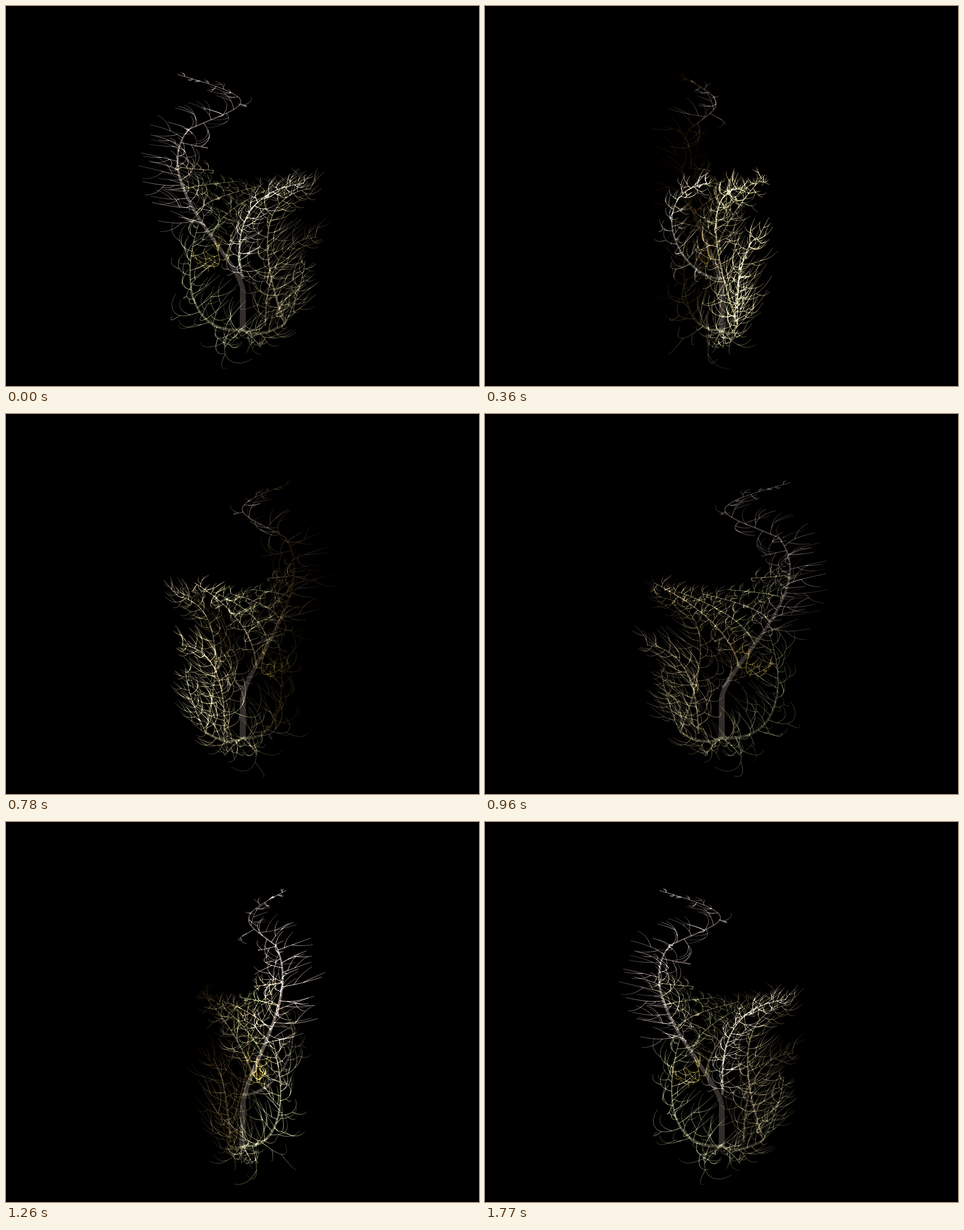
Write an HTML page with a canvas that moves like this. It is 835 px wide and 671 px high and loops after 1.8 s.

```html
<!DOCTYPE html>
<html lang="en">
<head>
<meta charset="utf-8">
<title>Turning tree</title>
<style>
  html, body { margin: 0; width: 100%; height: 100%; overflow: hidden; background: #000; }
  canvas { display: block; }
</style>
</head>
<body>
<canvas id="stage" width="835" height="671"></canvas>
<script>
const ctx = document.getElementById('stage').getContext('2d');
const AXIS = 418, LOOP = 1800, STEP = 30;
const segments = [];

let seed = 7;
const rand = () => (seed = (seed * 16807) % 2147483647) / 2147483647;
const spread = n => (rand() - 0.5) * n;

// Vectors are [x from the axis, y down the screen, z away from the viewer].
const add = (a, b, k = 1) => a.map((v, i) => v + b[i] * k);
const sub = (a, b) => add(a, b, -1);
const mix = (a, b, t) => a.map((v, i) => v + (b[i] - v) * t);
const size = a => Math.hypot(...a);
const unit = a => { const n = size(a) || 1; return a.map(v => v / n); };
const cross = (a, b) => [
  a[1] * b[2] - a[2] * b[1],
  a[2] * b[0] - a[0] * b[2],
  a[0] * b[1] - a[1] * b[0]
];

// Bezier curve of any degree
function bezier(points, t) {
  while (points.length > 1) points = points.slice(1).map((p, i) => mix(points[i], p, t));
  return points[0];
}

function line(a, b, width, tint, level) {
  segments.push({ a, b, width, tint, level });
}

// Starts straight out, then bends more and more towards the pull direction.
function twig(p, dir, length, pull, tint, depth = 0) {
  const joints = depth ? 6 : 9;
  for (let i = 0; i < joints; i++) {
    const q = add(p, dir, length / joints * (0.85 + 0.3 * rand()));
    const fade = 1 - i / joints;
    line(p, q, 0.6 + 0.5 * fade - 0.1 * depth, tint, 0.36 + 0.14 * fade);
    if (!depth && (i === 1 || i === 3)) {
      const side = unit(cross(dir, [spread(2), spread(2), spread(2)]));
      twig(q, unit(add(dir, side, 1.2)), length * 0.55, pull, tint, 1);
    }
    dir = unit(add(dir, pull, 0.14 + 0.09 * i));
    p = q;
  }
}

// A limb tapers from w0 to w1 and carries twigs at golden-angle turns.
function limb(curve, { w0 = 3.5, w1 = 0.8, tint, pull, reach = 0, from = 0, gap = 8.5, taper = 0.6 }) {
  const n = 24;
  let a = curve[0], due = 0, turn = rand() * 6.28;
  for (let i = 1; i <= n; i++) {
    const u = i / n, b = bezier(curve, u), w = w0 + (w1 - w0) * u;
    line(a, b, w, tint, 0.2 + 0.32 / w);
    if (reach && u >= from) due += size(sub(b, a));
    const along = unit(sub(b, a));
    const e1 = unit(cross(along, [0.3, 0.2, 1]));
    const e2 = cross(along, e1);
    while (due >= gap) {
      due -= gap;
      turn += 2.4;
      const out = add(e1.map(v => v * Math.cos(turn)), e2, Math.sin(turn));
      const length = reach * (0.8 + 0.4 * rand()) * (1 - taper * u);
      twig(add(b, along, -due), unit(add(out, along, 0.25)), length, unit(pull), tint);
    }
    a = b;
  }
}

const ROSE = [215, 198, 188], PALE = [215, 208, 188], MOSS = [192, 194, 150];
const STRAW = [208, 194, 148], LEAF = [180, 190, 130], GOLD = [206, 182, 82];
const base = [0, 572, 0], fork = [0, 500, 0], neck = [-96, 218, -30];
const stem = [fork, [-10, 440, 0], [-170, 310, -55], neck];
const left = [-0.92, -0.2, -0.3];

// Stem and the hook at its top
limb([base, fork], { w0: 11, w1: 10, tint: ROSE });
limb(stem, { w0: 9, w1: 2.5, tint: ROSE, pull: left, reach: 92, from: 0.42, taper: 0.2 });
limb([neck, [0, 175, 0], [60, 170, 0], [-115, 121, -43]],
  { w0: 2.5, w1: 0.6, tint: ROSE, pull: left, reach: 84, gap: 15, taper: 0.9 });

// Low loop on the left and the arm that starts level
limb([base, [-90, 580, -40], [-112, 490, -50], [-78, 385, -30]],
  { w0: 6, tint: MOSS, pull: [0.72, -0.65, 0.12], reach: 88, taper: 0.4 });
limb([[0, 482, 0], [0, 480, -85], [-45, 330, -130], [108, 313, -62]],
  { w0: 5, tint: PALE, pull: [0.75, -0.6, 0.25], reach: 72, from: 0.15 });

// Right-hand fan
const foot = [74, 562, 5];
const fan = { tint: STRAW, pull: [0.72, -0.68, 0.15], reach: 88, gap: 8 };
limb([base, [30, 588, 8], foot], { ...fan, w0: 5, w1: 4, reach: 55, taper: 0 });
limb([foot, [-5, 340, -49], [120, 322, -11]], fan);
limb([foot, [104, 500, -5], [110, 450, -2]], { ...fan, w0: 2, tint: MOSS, reach: 55 });
limb([[40, 565, 10], [40, 415, 20], [130, 408, 27]], fan);

// Swept side branches, each longer than the one above
for (let i = 0; i < 5; i++) {
  const start = bezier(stem, 0.78 - 0.133 * i);
  const end = mix([-52, 290, -4], [113, 298, 44], i / 4);
  end[1] += 6 * i * (4 - i);
  const elbow = [
    start[0] + (end[0] - start[0]) * 0.12,
    start[1] + (end[1] - start[1]) * 0.56,
    (start[2] + end[2]) / 2
  ];
  limb([start, elbow, end], {
    w0: 2 + 0.4 * i, tint: i % 2 ? LEAF : STRAW,
    pull: [-0.85, -0.4, 0.15], reach: 42 + 5 * i, from: 0.1
  });
}

// Drooping twig and short roots
limb([[-50, 415, -10], [-20, 490, -15], [-92, 440, -8]],
  { w0: 2, tint: GOLD, pull: [-0.4, -0.8, 0], reach: 42 });
for (const side of [-1, 1]) {
  limb([base, [side * 20, 585, -2], [side * 32, 604, -8]],
    { w0: 3, tint: MOSS, pull: [0.4, -0.9, 0.1], reach: 58, gap: 7 });
}

// Nearer parts glow; farther parts lose blue first, then green, then red.
const RANGE = [112, 98, 82];
function shade({ tint, level }, depth) {
  return tint.map((c, i) => {
    const k = depth < 0 ? 1 - depth / 80 : Math.max(0, 1 - depth / RANGE[i]);
    return Math.min(255, Math.round(c * level * k));
  });
}

function draw(angle) {
  const c = Math.cos(angle), s = Math.sin(angle);
  const px = p => AXIS + p[0] * c + p[2] * s;
  const far = p => p[2] * c - p[0] * s;
  ctx.globalCompositeOperation = 'source-over';
  ctx.fillStyle = '#000';
  ctx.fillRect(0, 0, 835, 671);
  ctx.globalCompositeOperation = 'lighter';
  for (const seg of segments) {
    const rgb = shade(seg, (far(seg.a) + far(seg.b)) / 2);
    if (rgb[0] < 3) continue;
    ctx.strokeStyle = `rgb(${rgb})`;
    ctx.lineWidth = seg.width;
    ctx.beginPath();
    ctx.moveTo(px(seg.a), seg.a[1]);
    ctx.lineTo(px(seg.b), seg.b[1]);
    ctx.stroke();
  }
}

function tick() {
  const step = Math.floor(performance.now() % LOOP / STEP);
  draw(step * STEP / LOOP * 2 * Math.PI);
  requestAnimationFrame(tick);
}
tick();
</script>
</body>
</html>
```
